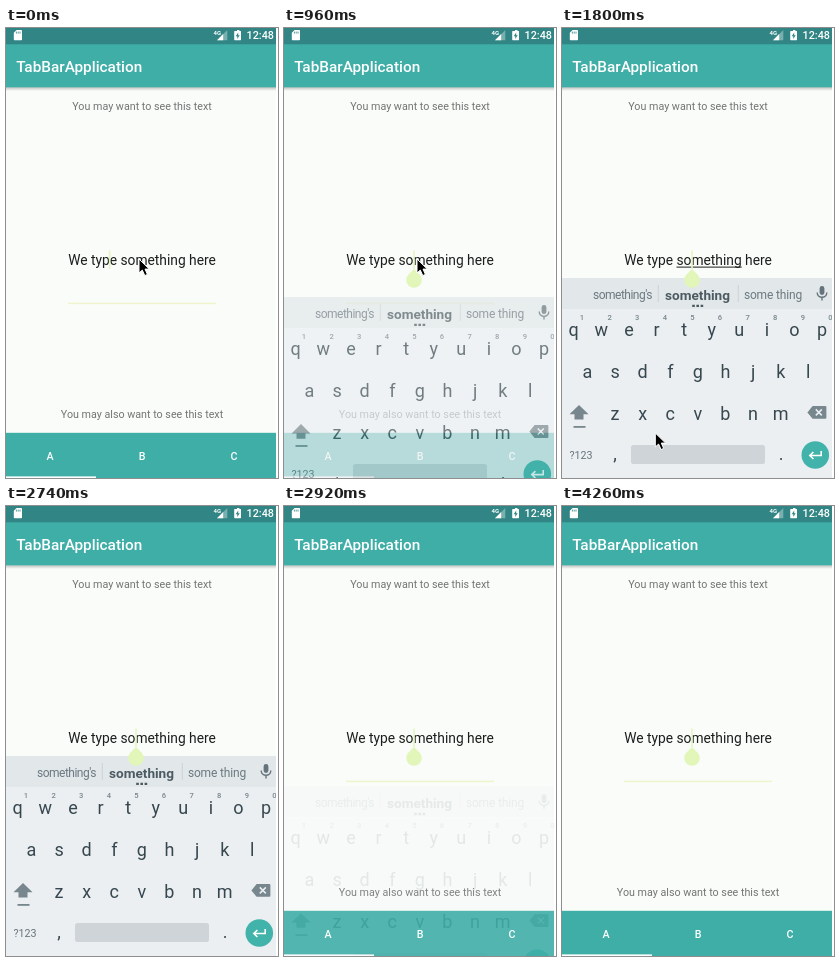
These frames come from a looping animation (272 by 450 pixels, 4500 ms). An HTML page:

```html
<!DOCTYPE html>
<html lang="en">
<head>
<meta charset="utf-8">
<title>Keyboard over tab bar</title>
<style>
html, body { margin: 0; width: 100%; height: 100%; overflow: hidden; background: #fff; }
svg { display: block; width: 100%; height: 100%; font-family: Roboto, sans-serif; }
.mid { text-anchor: middle; }
.note { font-size: 10.73px; fill: #727573; }
.tab { font-size: 10.7px; font-weight: 500; fill: #fff; }
.key { font-size: 18px; fill: #37474f; }
.hint { font-size: 7.6px; font-weight: 500; fill: #78868d; }
.word { font-size: 12px; fill: #6b7980; }
</style>
</head>
<body>
<svg viewBox="0 0 272 450">
  <defs>
    <clipPath id="screen"><rect width="270" height="450"/></clipPath>
    <linearGradient id="shade" x2="0" y2="1">
      <stop offset="0" stop-color="#000" stop-opacity=".24"/>
      <stop offset="1" stop-color="#000" stop-opacity="0"/>
    </linearGradient>
  </defs>
  <g clip-path="url(#screen)">
    <rect width="270" height="450" fill="#f9fcf9"/>
    <rect y="59" width="270" height="4" fill="url(#shade)"/>
    <rect y="16" width="270" height="43.3" fill="#3faea7"/>
    <rect width="270" height="16.3" fill="#318584"/>
    <text x="10.3" y="43.5" font-size="15.33" font-weight="500" fill="#fff">TabBarApplication</text>

    <g fill="#fff">
      <path d="M10.6 2H15.2Q16 2 16 2.8V11.4Q16 12.2 15.2 12.2H8.6Q7.8 12.2 7.8 11.4V4.8Z"/>
      <path d="M10.4 3.6V5.6M12.2 3.6V5.6M14 3.6V5.6" stroke="#318584" stroke-width=".8"/>
      <text x="207.5" y="7.4" font-size="6" font-weight="700">4G</text>
      <path d="M221.3 2V12.2H211Z" opacity=".35"/>
      <path d="M217.2 6.1V12.2H211Z"/>
      <path d="M230 3H231V2H233.4V3H234.5Q235 3 235 3.6V11.6Q235 12.2 234.4 12.2H228.8Q228.2 12.2 228.2 11.6V3.6Q228.2 3 228.8 3Z"/>
      <path d="M232.2 4.4L229.7 8.2H231.3V11L233.7 7.2H232.2Z" fill="#318584"/>
      <text x="268" y="11.4" font-size="10.8" font-weight="500" text-anchor="end">12:48</text>
    </g>

    <text class="note mid" x="136" y="82">You may want to see this text</text>
    <text class="note mid" x="136" y="390">You may also want to see this text</text>
    <rect x="62" y="274.6" width="148" height="1.6" fill="#f0f4cd"/>
    <text class="mid" x="136" y="237" font-size="13.8" fill="#1c1e1d">We type something here</text>
    <rect id="mark" x="114.5" y="238.6" width="65.2" height="1" fill="#1c1e1d"/>
    <rect id="caret" y="222.5" width="1.6" height="18.5" fill="#e6f5c4"/>

    <rect y="404.8" width="270" height="45.2" fill="#3faea7"/>
    <rect y="448.4" width="90" height="1.6" fill="#fff"/>
    <text class="tab mid" x="44" y="432">A</text>
    <text class="tab mid" x="136" y="432">B</text>
    <text class="tab mid" x="228" y="432">C</text>

    <g id="board">
      <rect y="250" width="270" height="31" fill="#e2e7ea"/>
      <rect y="281" width="270" height="170" fill="#ebeff2"/>
      <path d="M96.3 257V274M176.3 257V274" stroke="#ccd2d6"/>
      <text class="word mid" x="60.5" y="271" letter-spacing="-.5">something's</text>
      <text class="mid" x="135.5" y="271.5" font-size="13.6" font-weight="700" fill="#4c5a62">something</text>
      <text class="word mid" x="211" y="271" letter-spacing="-.15">some thing</text>
      <path d="M130.2 277.8H132.8M134.4 277.8H137M138.6 277.8H141.2" stroke="#4c5a62" stroke-width="2.3"/>
      <rect x="257.6" y="258" width="4.8" height="9" rx="2.4" fill="#65747c"/>
      <path d="M255.2 264.5A4.8 4.8 0 0 0 264.8 264.5M260 269.3V272.5" fill="none" stroke="#65747c" stroke-width="1.4"/>
      <g id="keys"></g>
      <path d="M17 377L26.5 386.3H21.5V391.6H12.5V386.3H7.5Z" fill="#78868d"/>
      <rect x="11.5" y="398" width="12" height="1.8" fill="#78868d"/>
      <path d="M250.6 378H263.4Q264.4 378 264.4 379V389.8Q264.4 390.8 263.4 390.8H250.6L245.4 384.4Z" fill="#78868d"/>
      <path d="M253.8 381.4L259.8 387.4M259.8 381.4L253.8 387.4" stroke="#ebeff2" stroke-width="1.5"/>
      <text x="7.5" y="430.5" font-size="10.7" fill="#65747c">?123</text>
      <rect x="69" y="417" width="134" height="19" rx="2.5" fill="#ced4d8"/>
      <circle cx="253.3" cy="427" r="13.8" fill="#42b3aa"/>
      <path d="M259.2 423V427.5H248M251.4 424L247.8 427.5L251.4 431" fill="none" stroke="#fff" stroke-width="1.6"/>
    </g>

    <path id="drop" d="M130 241L135.5 246.4A7.8 7.8 0 1 1 124.5 246.4Z" fill="#e2f6b9"/>
    <path id="mouse" d="M0 0V14L3.3 11.1L5.8 16.6L8.4 15.4L6 10.1H10.3Z" fill="#000" stroke="#fff" stroke-width="1"/>
  </g>
</svg>
<script>
const LOOP = 4500;
const $ = id => document.getElementById(id);
const [mark, caret, board, drop, mouse] = ["mark", "caret", "board", "drop", "mouse"].map($);

function label(cls, x, y, str) {
  return `<text class="${cls} mid" x="${x}" y="${y}">${str}</text>`;
}
function row(str, x, y, cls = "key") {
  return [...str].map((c, i) => label(cls, x + i * 27.6, y, c)).join("");
}
$("keys").innerHTML =
  row("qwertyuiop", 11.7, 307.5) + row("1234567890", 20, 292, "hint") +
  row("asdfghjkl", 25.5, 349.5) + row("zxcvbnm", 53, 391.5) +
  label("key", 53, 432, ",") + label("key", 219, 432, ".");

const span = (t, from, len) => Math.min(1, Math.max(0, (t - from) / len));
const smooth = p => p * p * (3 - 2 * p);
const show = (el, on) => el.setAttribute("visibility", on ? "visible" : "hidden");
const move = (el, x, y) => el.setAttribute("transform", `translate(${x.toFixed(2)} ${y.toFixed(2)})`);

// Caret visible periods: start, end
const blinks = [[0, 220], [620, 1180], [1660, 2140], [2740, 3340], [3960, LOOP]];

function draw(t) {
  show(caret, blinks.some(([a, b]) => t >= a && t < b));
  caret.setAttribute("x", t < 620 ? 102.8 : 129.2);
  show(drop, t >= 660);
  show(mark, t >= 1000 && t < 2740);

  const rise = 1 - span(t, 920, 260);
  const fade = 1 - span(t, 880, 260);
  const exit = span(t, 2760, 240);
  move(board, 0, 45 * (rise ** 5 + exit));
  board.setAttribute("opacity", (1 - fade ** 3.2) * (1 - exit) ** 2);

  const p = smooth(span(t, 1440, 520));
  move(mouse, 133 - 61 * p ** 1.7, 231 + 224 * p);
  show(mouse, t < 1960);
}

const start = performance.now();
function tick() {
  draw((performance.now() - start) % LOOP);
  requestAnimationFrame(tick);
}
tick();
</script>
</body>
</html>
```
